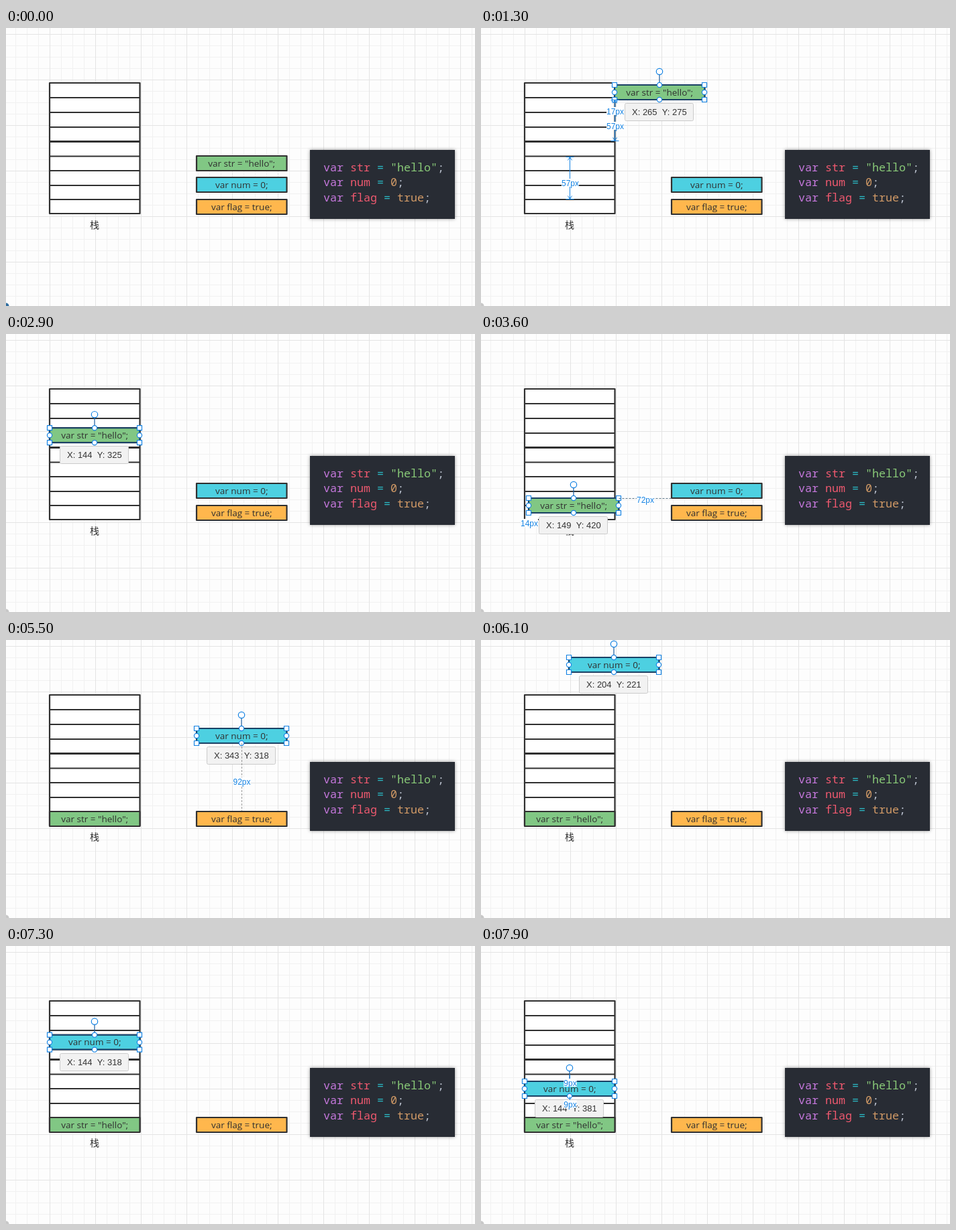
Recreate the animation shown at these times as an HTML page with a canvas. Size 699 by 415 pixels, loop 8000 ms.

```html
<!DOCTYPE html>
<html lang="zh">
<head>
<meta charset="utf-8">
<title>Stack push</title>
<style>
html, body { margin: 0; width: 100%; height: 100%; overflow: hidden; background: #fdfdfd; }
canvas { display: block; width: 699px; height: 415px; }
</style>
</head>
<body>
<canvas></canvas>
<script>
const W = 699, H = 415, LOOP = 8000, STEP = 100;
const BOX_W = 134.5, BOX_H = 22, SCALE = 1.1;
const INK = '#303030', BLUE = '#1583e3';
const SANS = '"Liberation Sans", Arial, sans-serif';
const canvas = document.querySelector('canvas');
const ctx = canvas.getContext('2d');
const ratio = window.devicePixelRatio || 1;
canvas.width = W * ratio;
canvas.height = H * ratio;
ctx.scale(ratio, ratio);

// Paths as [time, x, y] of the upper left corner
const strPath = [[900, 284, 191], [1300, 199, 85], [1800, 167, 28], [2300, 65, 50.5],
  [3300, 65, 200], [3600, 71, 245], [3700, 71, 245], [3800, 71, 248], [4000, 71, 248], [4200, 65, 256]];
const numPath = [[5200, 284, 223], [5500, 284, 132], [5800, 230, 50], [6100, 131, 26],
  [6400, 80, 36], [6700, 60, 70], [7000, 65, 98], [7900, 65, 202]];

function along(path, t) {
  const next = path.findIndex(key => key[0] > t);
  if (next === 0) return path[0].slice(1);
  if (next < 0) return path[path.length - 1].slice(1);
  const a = path[next - 1], b = path[next], k = (t - a[0]) / (b[0] - a[0]);
  return [a[1] + (b[1] - a[1]) * k, a[2] + (b[2] - a[2]) * k];
}

function line(x1, y1, x2, y2, color, width = 1, dash = []) {
  ctx.strokeStyle = color;
  ctx.lineWidth = width;
  ctx.setLineDash(dash);
  ctx.beginPath();
  ctx.moveTo(x1, y1);
  ctx.lineTo(x2, y2);
  ctx.stroke();
  ctx.setLineDash([]);
}

function text(str, x, y, font, color, align = 'center', base = 'middle') {
  ctx.font = font;
  ctx.fillStyle = color;
  ctx.textAlign = align;
  ctx.textBaseline = base;
  ctx.fillText(str, x, y);
}

function drawGrid() {
  ctx.fillStyle = '#fdfdfd';
  ctx.fillRect(0, 0, W, H);
  for (const [step, color] of [[17, '#f1f1f1'], [68, '#e4e4e4']]) {
    for (let x = 65.5 % step; x < W; x += step) line(x, 0, x, H, color);
    for (let y = 9.5 % step; y < H; y += step) line(0, y, W, y, color);
  }
}

function drawStack() {
  ctx.fillStyle = '#fff';
  ctx.fillRect(65, 82, BOX_W, 195);
  ctx.strokeStyle = INK;
  ctx.lineWidth = 2.2;
  ctx.lineJoin = 'round';
  ctx.strokeRect(65, 82, BOX_W, 195);
  for (const y of [104, 126, 148, 169.5, 191.5, 213, 235, 256])
    line(65, y, 65 + BOX_W, y, INK, y === 169.5 ? 3 : 2.2);
  text('栈', 132, 294, '14px "Noto Sans CJK SC", "Noto Sans CJK", sans-serif', INK);
}

function drawCode() {
  ctx.save();
  ctx.shadowColor = 'rgba(0,0,0,.4)';
  ctx.shadowBlur = 5;
  ctx.fillStyle = '#282c34';
  ctx.fillRect(453, 182, 216, 103);
  ctx.restore();
  const rows = [['str', '"hello"', '#89ca78'], ['num', '0', '#d19a66'], ['flag', 'true', '#d19a66']];
  rows.forEach(([name, value, color], row) => {
    let x = 473;
    const parts = [['var ', '#c678dd'], [name, '#ef596f'], [' = ', '#2bbac5'], [value, color], [';', '#bbc2cf']];
    for (const [str, fill] of parts) {
      text(str, x, 213.5 + row * 22.5, '16.67px "Noto Sans Mono", "DejaVu Sans Mono", monospace', fill, 'left', 'alphabetic');
      x += ctx.measureText(str).width;
    }
  });
}

function drawBox([x, y], label, fill) {
  ctx.fillStyle = fill;
  ctx.fillRect(x, y, BOX_W, BOX_H);
  ctx.strokeStyle = INK;
  ctx.lineWidth = 2.2;
  ctx.strokeRect(x, y, BOX_W, BOX_H);
  text(label, x + BOX_W / 2, y + 15.5, '13.5px "Open Sans", "Noto Sans", sans-serif', INK, 'center', 'alphabetic');
}

function ring(x, y, r) {
  ctx.beginPath();
  ctx.arc(x, y, r, 0, Math.PI * 2);
  ctx.fillStyle = '#fff';
  ctx.fill();
  ctx.strokeStyle = BLUE;
  ctx.lineWidth = 1.2;
  ctx.stroke();
}

function drawAnchors([x, y]) {
  const cx = x + 67, cy = y + BOX_H / 2;
  ring(cx, y, 3.6);
  ring(cx, y + BOX_H, 3.6);
  ring(x, cy, 3.6);
  ring(x + 134, cy, 3.6);
}

function drawSelection([x, y]) {
  ctx.strokeStyle = '#06529a';
  ctx.lineWidth = 1;
  ctx.strokeRect(x, y, 134, BOX_H);
  line(x + 67, y, x + 67, y - 16, '#1a5c9c', 1.2);
  ring(x + 67, y - 20, 4.7);
  drawAnchors([x, y]);
  for (const hx of [x, x + 134]) for (const hy of [y, y + BOX_H]) {
    ctx.fillStyle = '#fff';
    ctx.fillRect(hx - 3.5, hy - 3.5, 7, 7);
    ctx.strokeStyle = BLUE;
    ctx.lineWidth = 1.2;
    ctx.strokeRect(hx - 3.5, hy - 3.5, 7, 7);
  }
}

function drawTooltip([x, y]) {
  ctx.beginPath();
  ctx.roundRect(Math.round(x) + 15.5, Math.round(y) + 27.5, 102, 26, 2);
  ctx.fillStyle = '#f2f2f2';
  ctx.fill();
  ctx.strokeStyle = '#cbcbcb';
  ctx.lineWidth = 1;
  ctx.stroke();
  const docX = Math.floor(144 + (x - 65) / SCALE);
  const docY = Math.round(243.25 + (y - 50.3) / SCALE);
  text(`X: ${docX}  Y: ${docY}`, x + 26, y + 45, `13px ${SANS}`, '#333', 'left', 'alphabetic');
}

function tag(px, x, y) {
  const str = px + 'px';
  ctx.font = `12px ${SANS}`;
  const w = ctx.measureText(str).width;
  ctx.fillStyle = '#fff';
  ctx.fillRect(x - w / 2, y - 6, w, 12);
  text(str, x, y + 4.5, `12px ${SANS}`, BLUE, 'center', 'alphabetic');
}

function arrowSpan(x, y1, y2) {
  line(x, y1, x, y2, BLUE);
  for (const [y, dir] of [[y1, 1], [y2, -1]]) {
    line(x - 6, y, x + 6, y, BLUE);
    line(x, y, x - 3, y + 5 * dir, BLUE);
    line(x, y, x + 3, y + 5 * dir, BLUE);
  }
}

function dashedDrop(x, y1, y2, labelY) {
  line(x, y1, x, y2, '#999', 1, [3, 2]);
  tag(Math.round((y2 - y1) / SCALE), x, labelY);
}

function drawGuides(t, str, num) {
  const during = (from, to) => t >= from && t < to;
  if (during(1300, 1400)) {
    arrowSpan(199.5, 107.5, 168.5);
    tag(17, 200, 124);
    tag(57, 200, 146);
    arrowSpan(132.5, 192.5, 255.5);
    tag(57, 133, 231);
  }
  if (during(2300, 2400)) tag(9, 133, 85);
  if (during(3600, 4200)) {
    line(str[0] + BOX_W, str[1] + .5, 284, str[1] + .5, '#5d7688', 1, [3, 2]);
    tag(72, 245, str[1] + 2);
  }
  if (during(3600, 3800)) tag(14, 72, 282);
  if (during(5300, 5600)) dashedDrop(351.5, num[1] + BOX_H, 255, (num[1] + 290) / 2);
  if (during(6700, 6800)) dashedDrop(193.5, num[1] + BOX_H, 282.5, 195);
  if (during(7900, 8000)) {
    line(132.5, 192, 132.5, 198, BLUE);
    line(132.5, 225, 132.5, 231, BLUE);
    tag(9, 133, 204);
    tag(9, 133, 236);
  }
}

function draw(t) {
  const str = along(strPath, t), num = along(numPath, t);
  const dragStr = t >= 1000 && t < 4200, dragNum = t >= 5300;
  drawGrid();
  drawStack();
  drawCode();
  drawBox([284, 256], 'var flag = true;', '#ffb74d');
  drawBox(str, 'var str = "hello";', '#81c784');
  drawBox(num, 'var num = 0;', '#4dd0e1');
  if (t >= 400 && t < 1000) drawAnchors(str);
  if (t >= 4700 && t < 5300) drawAnchors(num);
  if (dragStr) drawSelection(str);
  if (dragNum) drawSelection(num);
  if (t >= 1000 && t < 4500) drawTooltip(str);
  if (dragNum) drawTooltip(num);
  drawGuides(t, str, num);

  ctx.beginPath();
  ctx.arc(0, H, 4.5, 0, Math.PI * 2);
  ctx.fillStyle = t < 1000 ? '#2f6d9f' : '#c8c8c8';
  ctx.fill();
}

const start = performance.now();
function tick() {
  const time = (performance.now() - start) % LOOP;
  draw(Math.floor(time / STEP) * STEP);
  requestAnimationFrame(tick);
}
tick();
</script>
</body>
</html>
```
